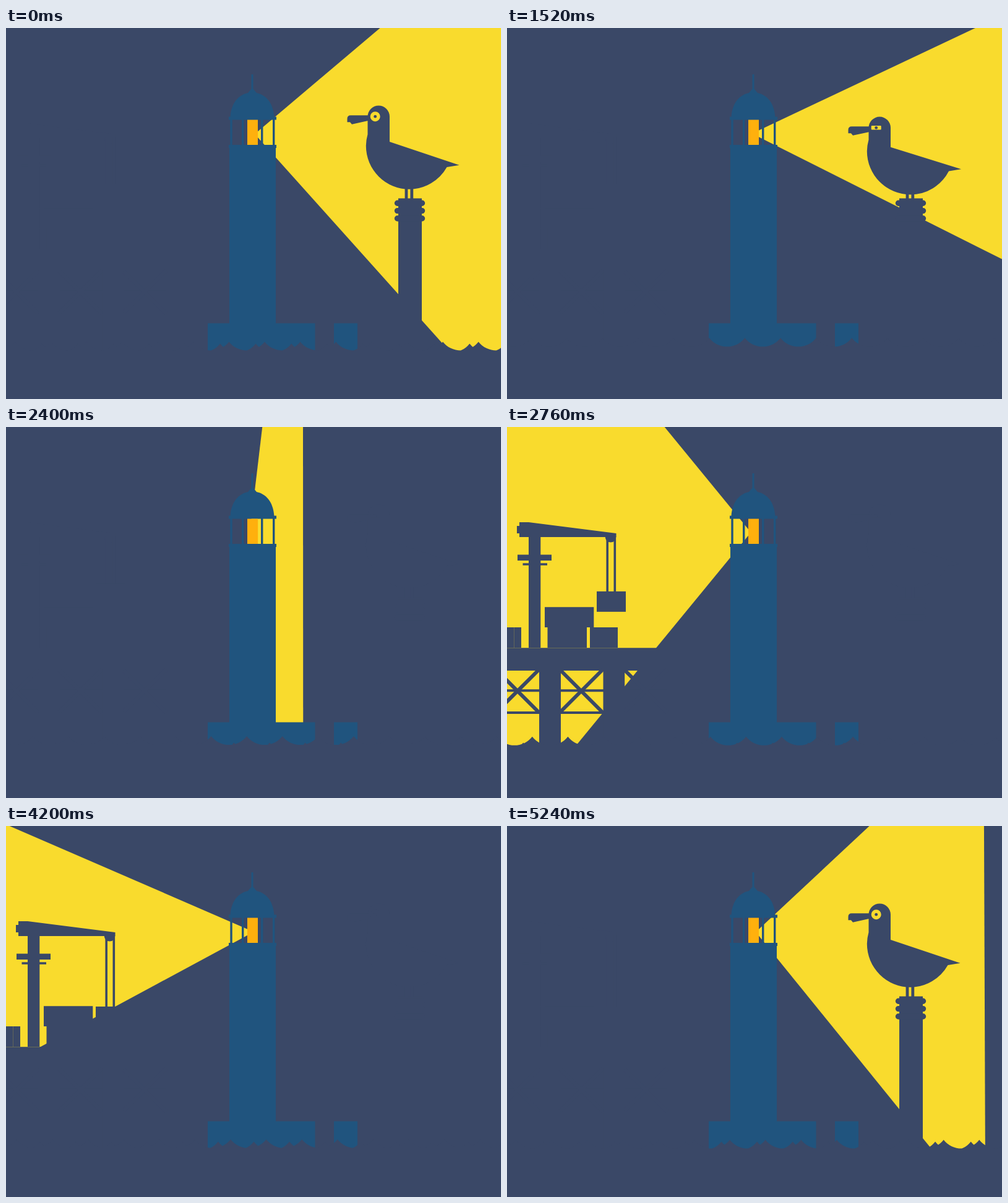
Write an HTML page that moves like this. It is 800 px wide and 600 px high and loops after 5280 ms.

```html
<!DOCTYPE html>
<html lang="en">
<head>
<meta charset="utf-8">
<title>Lighthouse</title>
<style>
  html, body { margin: 0; width: 100%; height: 100%; overflow: hidden; background: #3a4867; }
  svg { display: block; width: 100vw; height: 100vh; }
</style>
</head>
<body>
<svg viewBox="0 0 800 600" fill="#3a4867">
  <rect width="800" height="600"/>
  <polygon id="beam" fill="#f9db2d"/>

  <!-- harbour -->
  <path d="M20 154H35L176.500 172V178H20zM16 160h5v12h-5zM35 160h19.300V357H35zM17 206.500h55v9.500H17zM25.500 220.300h39.500v3.400H25.500z
           M158.500 177h18q-1 9.500-9 9.500t-9-9.500z
           M61 291.300h79.300V324H61zM65.500 324h63.500v33H65.500zM134 324h45v33h-45zM0 324h11.400v33H0zM11.600 324H23v33H11.600z
           M0 357.150H300V394H0zM52 390h35V600H52zM155.500 390h34.700V600h-34.700zM259 390h35V600h-35z
           M0 424.300h260v4H0zM0 460h260v4H0z"/>
  <path d="M-17 393 52 462M-17 461 52 392M86 393 155 462M86 461 155 392M190 393 259 462M190 461 259 392" stroke="#3a4867" stroke-width="6"/>
  <path id="ropes" stroke="#3a4867" stroke-width="3.600"/>
  <rect id="load" x="145" width="47" height="33"/>

  <!-- gull on its post -->
  <path d="M634 275.500h38V600h-38z"/>
  <path d="M632.500 283.300h40M632.500 295.600h40M632.500 308h40" stroke="#3a4867" stroke-width="9.400" stroke-linecap="round"/>
  <path id="gull" fill-rule="evenodd"/>
  <path id="legs" stroke="#3a4867" stroke-width="4.800"/>
  <path id="beak"/>
  <circle id="pupil" cx="596.700" r="2.400"/>

  <!-- lighthouse -->
  <g fill="#20547e">
    <path d="M361 189h75V480h-75zM326 477.500H499.500V560H326zM530 477.500h38V560h-38z
             M360 143.500h77v5h-77zM360 189h77v5h-77z
             M362.500 144C364 121 376 108 391 105L396.500 98.500V75h3V98.500L405 105C420 108 432 121 433.500 144z
             M362.300 148h3.400v42h-3.400zM381 148h3.400v42h-3.400zM412 148h3.400v42h-3.400zM431 148h3.400v42h-3.400z"/>
  </g>
  <rect x="390" y="148.500" width="17" height="40.500" fill="#ffb00d"/>

  <path id="sea"/>
</svg>
<script>
const LOOP = 5280, TURN = 2 * Math.PI;
const set = (id, attrs) => {
  for (const name in attrs) document.getElementById(id).setAttribute(name, attrs[name]);
};
const ease = (t, from, to) => {
  const u = Math.min(1, Math.max(0, (t - from) / (to - from)));
  return u * u * (3 - 2 * u);
};

// Flat fan of light turning about the lamp, seen with mild perspective
function drawBeam(t) {
  const boost = 0.445;
  const angle = 0.437 + (TURN - boost) * t / LOOP + boost * ease(t, 3560, 5060);
  const depth = Math.cos(angle);
  const reach = 1224 / (1 + 0.293 * depth);
  const x = 398.2 + 4.2 * depth, y = 171 + 0.5 * depth;
  const dx = reach * Math.sin(angle);
  const half = reach * 0.4165, skew = 0.0735 + 0.075 * depth;
  set('beam', { points: [
    x, y,
    x + dx * 0.996, y - half * (1 - skew),
    x + dx * 1.004, y + half * (1 + skew)
  ].join(' ') });
}

function drawGull(t) {
  const duck = ease(t, 300, 750) - ease(t, 1350, 1900);
  const squint = ease(t, 250, 480) - ease(t, 3000, 3300);
  const head = 143.2 + 23.5 * duck, body = 11.2 * duck, tx = 2 * duck, ty = 8.5 * duck;
  const h = 8 - 4.7 * squint, r = 8 - 7 * squint;
  const w = 16 - 2 * r, v = 2 * h - 2 * Math.min(r, h), ry = Math.min(r, h);
  const corner = (x, y) => `a${r} ${ry} 0 0 1 ${x * r} ${y * ry}`;
  const eye = `M${588.7 + r} ${head - h}h${w}${corner(1, 1)}v${v}${corner(-1, 1)}h${-w}${corner(-1, -1)}v${-v}${corner(1, -1)}z`;
  const curve = (x, y) => `A70.2 70.2 0 0 1 ${x} ${y + body}`;
  set('gull', { d: `M584.5 ${172 + body}V${head}a17.75 17.75 0 0 1 35.5 0V${184 + body}` +
    `L${732.5 + tx} ${221.7 + ty}L${712.5 + tx} ${225 + ty}` +
    curve(652, 260.8) + curve(581.8, 190.6) + curve(584.5, 172) + 'z' + eye });
  set('legs', { d: `M647 ${258 + body}V276M655.8 ${258 + body}V276` });
  set('beak', { d: `M586 ${head - 2}H557q-5.500 0-5.500 5.500v5.500h4.500l3 3.500L586 ${head + 6.6}z` });
  set('pupil', { cy: head });
}

function drawLoad(t) {
  const y = 253 + 39 * ease(t, 2300, 3500);
  set('load', { y });
  set('ropes', { d: `M162.200 176V${y + 1}M174.300 176V${y + 1}` });
}

function drawSea(t) {
  const sway = Math.cos(TURN * (t + 420) / LOOP), period = 57.6;
  const wave = (x, y) => `M${x - 8 * period} ${y}` +
    `a36.600 36.600 0 0 0 ${period} 0`.repeat(18) + 'V600H-160z';
  set('sea', { d: wave(374 - 15.5 * sway, 504 + 4 * sway) + wave(387 + 19 * sway, 510.5) });
}

function frame(now) {
  const t = now % LOOP;
  drawBeam(t);
  drawGull(t);
  drawLoad(t);
  drawSea(t);
  requestAnimationFrame(frame);
}
frame(0);
</script>
</body>
</html>
```
